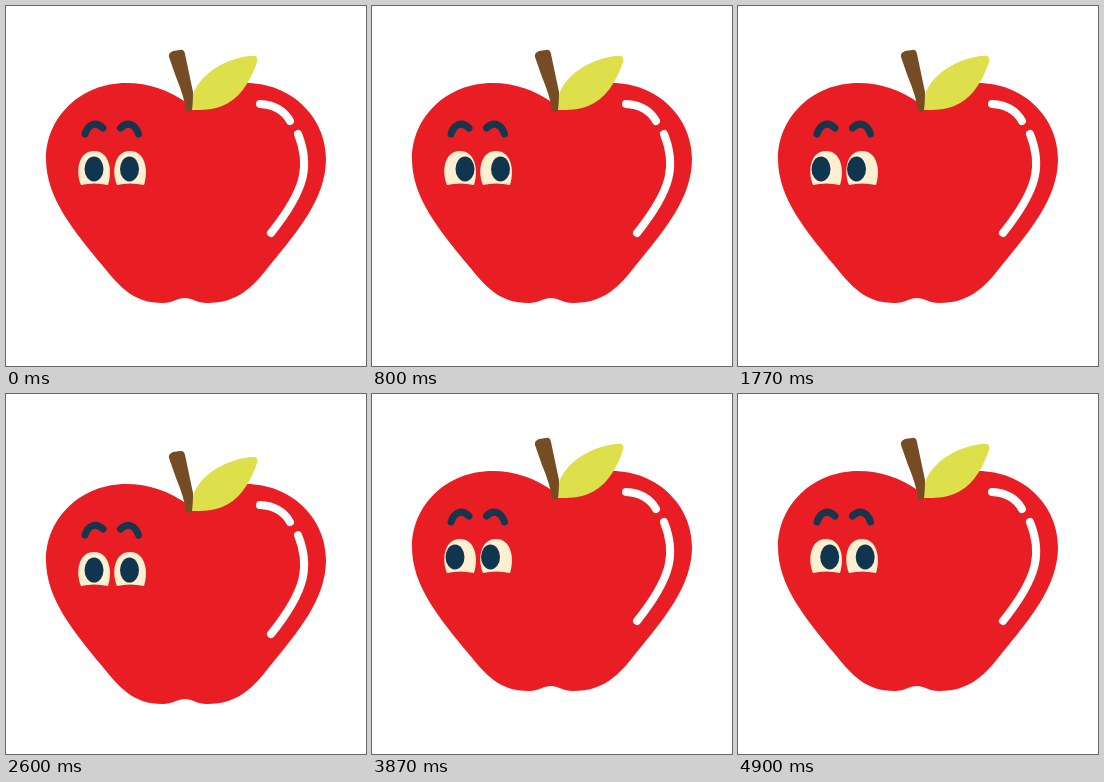
These frames come from a looping animation (360 by 360 pixels, 5000 ms). An HTML page:

```html
<!DOCTYPE html>
<html lang="en">
<head>
<meta charset="utf-8">
<title>Apple</title>
<style>
  html, body { margin: 0; width: 100%; height: 100%; overflow: hidden; background: #fff; }
  svg { display: block; width: 100vw; height: 100vh; }
</style>
</head>
<body>
<svg viewBox="0 0 360 360">
  <defs>
    <path id="sclera" d="M75 179C69 164 73 145 88 145C103 145 107 164 102 179Q88 176 75 179Z"/>
    <ellipse id="pupil" cx="88" cy="163" rx="9.5" ry="12.5"/>
    <path id="brow" d="M79 128C82 118 90 115 97 122"/>
  </defs>
  <g id="apple">
    <path fill="#e91e24" d="M181 97C163 84 143 77 120 77C75 77 40 111 40 153
      C40 192 68 225 96 259C114 281 127 297 157 297C166 297 172 292 179 292
      C186 292 191 297 201 297C232 297 247 281 264 259C292 225 320 192 320 153
      C320 111 285 77 240 77C217 77 199 84 181 97Z"/>
    <path fill="#dde04a" d="M186 104C183 92 190 75 208 63C222 54 240 49 249 50
      C252 51 252 54 250 59C243 78 232 94 216 100C207 104 196 104 186 104Z"/>
    <path fill="#754c24" d="M163 51Q162 47 167 45L174 44Q178 43 179 48L187 86
      Q187 97 186 104Q183 108 180 104Q178 90 170 71Z"/>
    <g fill="none" stroke="#fff" stroke-width="8" stroke-linecap="round">
      <path d="M254 98Q275 99 284 115"/>
      <path d="M292 128C304 158 301 182 265 227"/>
    </g>
    <g fill="none" stroke="#15364d" stroke-width="7" stroke-linecap="round">
      <use href="#brow"/>
      <use href="#brow" transform="matrix(-1 0 0 1 211.5 0)"/>
    </g>
    <g fill="#fdf0d0">
      <use href="#sclera"/>
      <use href="#sclera" x="36"/>
    </g>
    <g id="pupils" fill="#10364f">
      <use href="#pupil"/>
      <use href="#pupil" x="35.5"/>
    </g>
  </g>
</svg>
<script>
  const LOOP = 5000, CYCLE = 2100, DEPTH = 20, BOB_STEPS = 10;
  const apple = document.getElementById('apple');
  const pupils = document.getElementById('pupils');

  // Bob, glance right, sweep left, bob again, rest.
  const firstBob = [0, 100, 170, 230, 300, 370, 430, 500, 570, 630, 700];
  const sweep = [800, 870, 930, 1000];
  const secondBob = [1070, 1130, 1200, 1270, 1330, 1400, 1500, 1570, 1630, 1700, 1770];
  const sweepGaze = [5, 4, 1.5, -2];

  const dip = step => DEPTH / 2 * (1 - Math.cos(2 * Math.PI * step / BOB_STEPS));
  const poses = [
    ...firstBob.map((time, i) => ({ time, y: dip(i), gaze: i < 8 ? 0 : [0.5, 1.8, 3.7][i - 8] })),
    ...sweep.map((time, i) => ({ time, y: 0, gaze: sweepGaze[i] })),
    ...secondBob.map((time, i) => ({ time, y: dip(i), gaze: i ? -5 : -4.2 }))
  ];

  function draw(now) {
    const time = now % LOOP % CYCLE;
    const pose = poses.filter(p => p.time <= time).pop();
    apple.setAttribute('transform', `translate(0 ${pose.y.toFixed(2)})`);
    pupils.setAttribute('transform', `translate(${pose.gaze} 0)`);
  }

  let start;
  function tick(now) {
    start ??= now;
    draw(Math.max(0, now - start));
    requestAnimationFrame(tick);
  }
  draw(0);
  requestAnimationFrame(tick);
</script>
</body>
</html>
```
